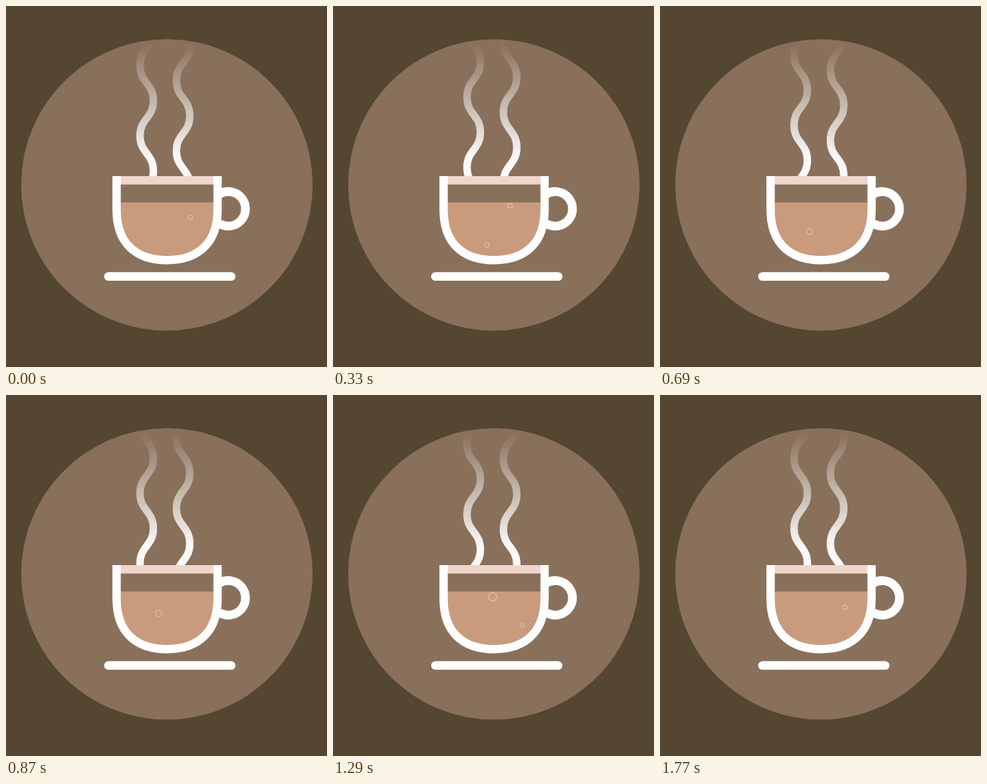
An HTML page for the animation above (1.8 s loop, 402x452 px).

```html
<!DOCTYPE html>
<html lang="en">
<head>
<meta charset="utf-8">
<title>Coffee cup</title>
<style>
  html, body { margin: 0; width: 100%; height: 100%; overflow: hidden; background: #544631; }
  svg { display: block; }
</style>
</head>
<body>
<svg width="402" height="452" viewBox="0 0 402 452" fill="none">
  <defs>
    <linearGradient id="fade" gradientUnits="userSpaceOnUse" x1="0" y1="46" x2="0" y2="188">
      <stop offset="0" stop-color="#fff" stop-opacity="0"/>
      <stop offset="1" stop-color="#fff" stop-opacity=".95"/>
    </linearGradient>
    <mask id="steamMask" maskUnits="userSpaceOnUse" x="0" y="0" width="402" height="213">
      <rect width="402" height="213" fill="url(#fade)"/>
    </mask>
    <path id="bowl" d="M138.5 213V255C138.5 294.5 160 318.3 201.5 318.3S265 294.5 265 255V213"/>
    <clipPath id="inside"><use href="#bowl"/></clipPath>
  </defs>

  <circle cx="201.5" cy="224" r="182.5" fill="#89705a"/>

  <g mask="url(#steamMask)" stroke="#fff" stroke-width="9.3">
    <g id="steam">
      <path id="wave"/>
      <use href="#wave" x="45.6" y="19"/>
    </g>
  </g>

  <g clip-path="url(#inside)">
    <path fill="#efd6cc" d="M138 213H266V223.5H138Z"/>
    <path fill="#c99b7c" d="M138 246H266V320H138Z"/>
  </g>

  <g id="bubbles" stroke="#ead3c5"></g>

  <g stroke="#fff" stroke-width="10.4">
    <use href="#bowl"/>
    <path d="M267 235.6A21.6 21.6 0 1 1 267 272.4" stroke-width="11"/>
    <path d="M128.3 338.6H282" stroke-width="10.8" stroke-linecap="round"/>
  </g>
</svg>
<script>
const LOOP = 1800, STEP = 30, PUFF = 600, WAVE = 88, SWAY = 16.8;
const SURFACE = 246, RISE = 1250, POP = 150;
const $ = id => document.getElementById(id);

function addPath(parent, d = '') {
  const el = document.createElementNS('http://www.w3.org/2000/svg', 'path');
  el.setAttribute('d', d);
  parent.append(el);
  return el;
}

const bend = dx => `c0 ${-WAVE / 4} ${dx} ${-WAVE / 4} ${dx} ${-WAVE / 2}`;
$('wave').setAttribute('d', `M184.6 ${118.5 + 3 * WAVE}` + (bend(-SWAY) + bend(SWAY)).repeat(5));

// A bubble follows its track at constant speed while it grows
const bubbles = [
  { start: 150, size: 2.4, growth: 3, track: 'M201 304.5C190 299 183 292 187 283S199 257 202 247' },
  { start: 950, size: 2, growth: 1.2, track: 'M226 302C231 298 242 285 239 279S226 256 219.5 247' }
];
for (const b of bubbles) {
  b.el = addPath($('bubbles'));
  b.track = addPath(document.querySelector('defs'), b.track);
  b.length = b.track.getTotalLength();
}

const ring = (x, y, r) => `M${x - r} ${y}a${r} ${r} 0 1 1 ${2 * r} 0a${r} ${r} 0 1 1 ${-2 * r} 0`;

function burst(x, size, p) {
  const near = size * p, far = size * Math.min(1, 2.1 * p);
  return [-0.6, 0, 0.6].map(a => {
    const at = d => `${x + d * Math.sin(a)} ${SURFACE - d * Math.cos(a)}`;
    return `M${at(near)}L${at(far)}`;
  }).join('');
}

function drawBubble({ start, size, growth, track, length, el }, time) {
  const age = (time - start + LOOP) % LOOP;
  const rising = age < RISE, popped = (age - RISE) / POP;
  const p = Math.min(1, age / RISE), r = size + growth * p;
  const { x, y } = track.getPointAtLength(length * p);
  el.setAttribute('d', rising ? ring(x, y, r) : popped < 1 ? burst(x, 9 + r, popped) : '');
  el.setAttribute('stroke-width', rising ? 1 : 2.4);
  el.setAttribute('opacity', rising ? 0.8 : 0.7);
}

const begin = performance.now();
function frame() {
  const t = Math.floor((performance.now() - begin) % LOOP / STEP) * STEP;
  $('steam').setAttribute('transform', `translate(0 ${-WAVE * (t % PUFF) / PUFF})`);
  bubbles.forEach(b => drawBubble(b, t));
  requestAnimationFrame(frame);
}
frame();
</script>
</body>
</html>
```
